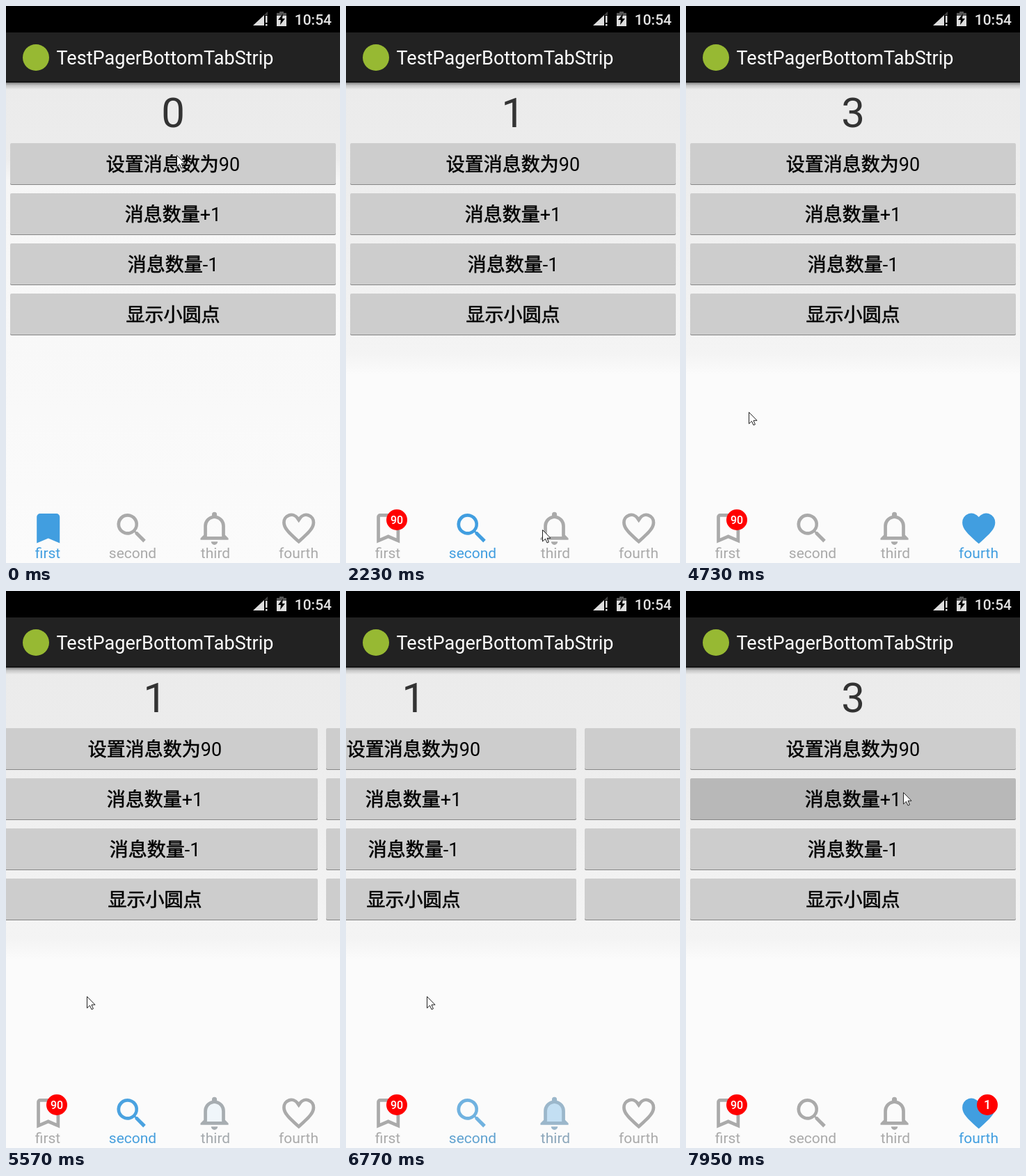
Animation of 480 by 800 pixels, one loop 8 s. Source, as an HTML page with a canvas:

```html
<!DOCTYPE html>
<html lang="zh-CN">
<head>
<meta charset="utf-8">
<style>
html, body { margin: 0; height: 100%; overflow: hidden; background: #fafafa; }
canvas { display: block; }
</style>
</head>
<body>
<canvas id="stage" width="480" height="800"></canvas>
<script>
const c = document.getElementById('stage').getContext('2d');
const LOOP = 8000, STEP = 126, BURSTS = [0, 1150, 2230, 3330, 4450, 5570, 6650];
const FONT = 'Roboto, "Noto Sans CJK SC", "Noto Sans CJK", sans-serif';
const BLUE = [65, 158, 224], GREY = [170, 170, 170];
const BUTTONS = [['设置消息数为', '90'], ['消息数量', '+1'], ['消息数量', '-1'], ['显示小圆点', '']];

// Icons on a 24 unit grid; the outline is the inner edge of the same shape.
const TABS = [
  ['first', 60, 'M5 5a2 2 0 0 1 2-2h10a2 2 0 0 1 2 2v16l-7-3-7 3z'],
  ['second', 182, 'M15.5 14h-.8l-.3-.3a6.5 6.5 0 1 0-.7.7l.3.3v.8l5 5 1.5-1.5zM14 9.5a4.5 4.5 0 1 0-9 0 4.5 4.5 0 1 0 9 0z'],
  ['third', 301, 'M9.5 20h4a2 2 0 0 1-4 0zM18 16v-5.5a6.5 6.5 0 0 0-5-6.3V3.5a1.5 1.5 0 0 0-3 0v.7a6.5 6.5 0 0 0-5 6.3V16l-2 2v1h17v-1z'],
  ['fourth', 420.5, 'M12 21.3L10.5 20C5.4 15.4 2 12.3 2 8.5a5.5 5.5 0 0 1 10-3.4A5.5 5.5 0 0 1 22 8.5c0 3.8-3.4 6.9-8.5 11.5z'],
].map(([label, x, d]) => ({ label, x, path: new Path2D(d) }));
const ARROW = new Path2D('M.5 .5V17L4.5 13.3 7 19 9.4 18 7 12.3H12z');

// Taps hit a tab; swipes turn three pages each way, one page per period.
const TAPS = [[1815, 1], [2363, 2], [2762, 3], [3463, 1], [3862, 3]];
const SWIPES = [
  { start: 4705, period: 465, from: 3, dir: -1 },
  { start: 6112, period: 395, from: 0, dir: 1 },
];
const SWIPE_X = 89, SWIPE_Y = 582, SWIPE_R = 76;
const STOPS = [
  [260, 245, 214], [300, 248, 268], [560, 240, 232], [1280, 240, 232], [2230, 282, 752],
  [3580, 341, 765], [4705, SWIPE_X, SWIPE_Y], [7100, SWIPE_X, SWIPE_Y], [7280, 312, 380], [7658, 312, 289],
  ...TAPS.map(([t, i]) => [t, 60 + 120 * i, 766]),
].sort((a, b) => a[0] - b[0]);

const smooth = u => u * u * (3 - 2 * u);
const last = (list, ok) => list.filter(ok).pop();

// The screen refreshes in bursts of even steps.
function snap(t) {
  const start = last(BURSTS, s => s <= t);
  return start + STEP * Math.floor((t - start) / STEP);
}

function pagePosition(t) {
  const swipe = last(SWIPES, s => s.start <= t);
  if (!swipe) return (last(TAPS, k => k[0] <= t) || [0, 0])[1];
  const turns = Math.min((t - swipe.start) / swipe.period, 3), done = Math.floor(turns);
  return swipe.from + swipe.dir * (done + smooth(turns - done));
}

function pointer(t) {
  const i = STOPS.findIndex(k => k[0] > t);
  const b = STOPS[i < 0 ? STOPS.length - 1 : i], a = STOPS[i - 1] || b;
  const u = a === b ? 0 : (t - a[0]) / (b[0] - a[0]);
  const swipe = last(SWIPES, s => s.start <= t && t < 7100);
  const turns = swipe ? Math.min((t - swipe.start) / swipe.period, 3) : 0;
  const drag = swipe ? SWIPE_R * (1 + swipe.dir * Math.cos(2 * Math.PI * turns)) : 0;
  return [a[1] + (b[1] - a[1]) * u + drag, a[2] + (b[2] - a[2]) * u];
}

function rect(x, y, w, h, fill, r = 0) {
  c.fillStyle = fill;
  c.beginPath();
  c.roundRect(x, y, w, h, r);
  c.fill();
}
function shape(d, fill) {
  c.fillStyle = fill;
  c.fill(new Path2D(d));
}
function text(s, x, y, size, fill, align = 'center', weight = 400) {
  c.font = `${weight} ${size}px ${FONT}`;
  c.textAlign = align;
  c.fillStyle = fill;
  c.fillText(s, x, y);
}
function shade(y0, y1, ...stops) {
  const g = c.createLinearGradient(0, y0, 0, y1);
  stops.forEach(([y, col]) => g.addColorStop((y - y0) / (y1 - y0), col));
  rect(0, y0, 480, y1 - y0, g);
}

function backdrop(edge) {
  shade(110, 800, [110, '#ebebeb'], [200, '#ececec'], [edge - 15, edge > 300 ? '#f4f4f4' : '#ededed'],
    [edge + 15, edge > 300 ? '#fbfbfb' : '#f6f6f6'], [800, '#fbfbfb']);
  shade(110, 120, [110, 'rgba(0,0,0,.45)'], [114, 'rgba(0,0,0,.16)'], [120, 'rgba(0,0,0,0)']);
}

function header() {
  rect(0, 0, 480, 38, '#000');
  shape('M355 28h16V13z', '#ddd');
  shape('M371 13l5-5v5z', '#444');
  rect(373, 14, 2.5, 10, '#ddd');
  rect(373, 26, 2.5, 2.5, '#ddd');
  rect(393, 8, 6, 3, '#555');
  rect(389, 10, 14, 4, '#555');
  rect(389, 14, 14, 15, '#ddd');
  shape('M398 11l-7 9h4l-1 7 7-9h-4z', '#000');
  text('10:54', 468, 27, 21, '#e4e4e4', 'right', 500);
  rect(0, 38, 480, 72, '#222');
  rect(0, 108, 480, 2, '#151515');
  rect(24, 55, 38, 38, '#97b933', 19);
  text('TestPagerBottomTabStrip', 72.5, 84, 27.1, '#fff', 'left');
}

function page(n, x, pressed) {
  c.save();
  c.translate(x, 0);
  text(n, 240, 174, 60, '#333');
  BUTTONS.forEach(([words, count], i) => {
    const y = 197 + 72 * i;
    rect(6, y + 2, 468, 58, '#868686', 2);
    rect(6, y, 468, 59, i === pressed ? '#b8b8b8' : '#cdcdcd', 2);
    c.font = `27px ${FONT}`;
    const left = 240 - c.measureText(words + count).width / 2;
    const width = c.measureText(words).width;
    text(words, left, y + 40, 27, '#000', 'left');
    c.strokeStyle = '#000';
    c.lineWidth = 0.6;
    c.strokeText(words, left, y + 40);
    text(count, left + width, y + 40, 27, '#000', 'left');
  });
  c.restore();
}

function tab({ label, x, path }, i, on) {
  const mix = GREY.map((v, n) => Math.round(v + (BLUE[n] - v) * on));
  c.save();
  c.translate(32.4 + 120 * i, 722);
  c.scale(2.36, 2.36);
  c.save();
  c.clip(path, 'evenodd');
  c.globalAlpha = 1 - on;
  c.strokeStyle = `rgb(${GREY})`;
  c.lineWidth = 4;
  c.stroke(path);
  c.restore();
  c.globalAlpha = on;
  c.fillStyle = `rgb(${BLUE})`;
  c.fill(path, 'evenodd');
  c.restore();
  text(label, x, 793, 21, `rgb(${mix})`);
}

function badge(i, s, size) {
  const x = 73 + 120 * i;
  rect(x - 15, 723, 30, 30, '#f00', 15);
  text(s, x, 738 + size * 0.35, size, '#fff', 'center', 500);
}

function draw(t) {
  const q = snap(t), pos = pagePosition(q), first = Math.floor(pos);
  const tap = last(TAPS, k => k[0] <= q && q < k[0] + 2 * STEP);
  const pressed = t >= 7950 ? 1 : q === 1150 ? 0 : -1;

  backdrop(q < 1150 ? 235 : 515);
  header();
  for (const n of [first, first + 1]) page(n, Math.round((n - pos) * 480), pressed);

  if (tap) rect(120 * tap[1], 716, 120, 84, '#ebebeb');
  TABS.forEach((item, i) => tab(item, i, Math.max(0, 1 - Math.abs(pos - i))));
  if (q > 1150) badge(0, '90', 16);
  if (t >= 7950) badge(3, '1', 18);

  const [x, y] = pointer(q);
  c.save();
  c.translate(Math.round(x), Math.round(y));
  c.fillStyle = '#fff';
  c.strokeStyle = '#222';
  c.lineWidth = 1;
  c.fill(ARROW);
  c.stroke(ARROW);
  c.restore();
}

function loop() {
  draw(performance.now() % LOOP);
  requestAnimationFrame(loop);
}
loop();
</script>
</body>
</html>
```
